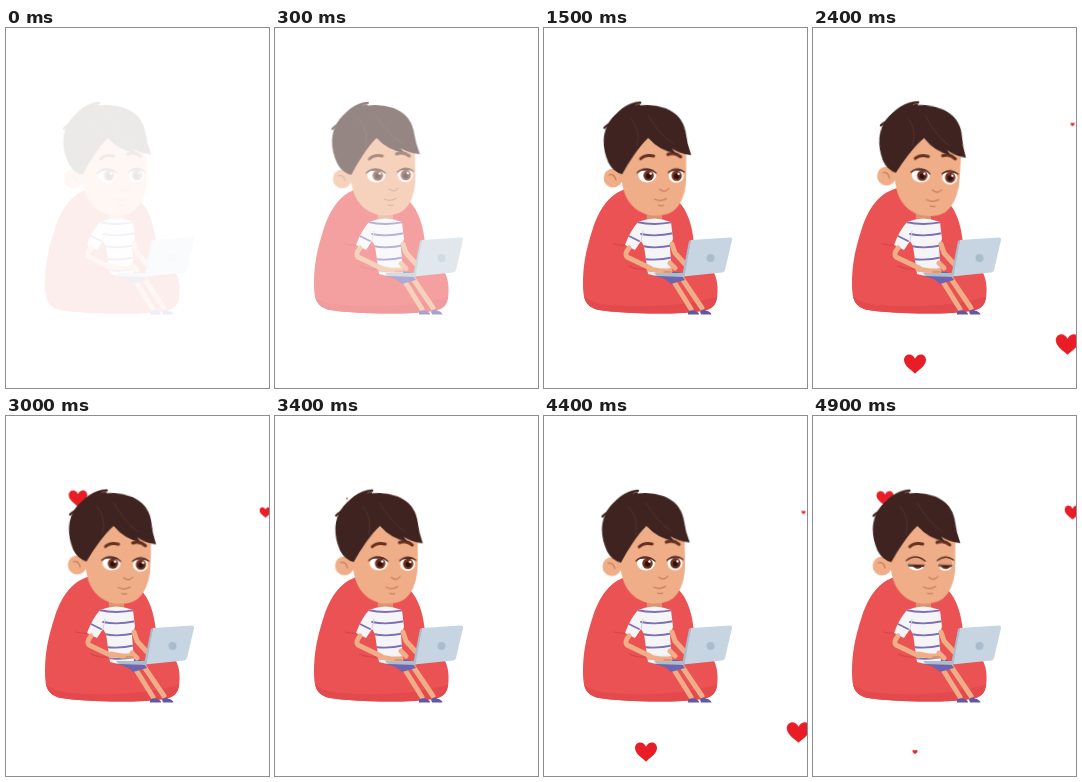
Write an HTML page without scripts that moves like this. It is 263x360 px and loops after 5 s.

```html
<!DOCTYPE html>
<html lang="en">
<head>
<meta charset="utf-8">
<title>Boy with laptop</title>
<style>
html, body { margin: 0; width: 100%; height: 100%; overflow: hidden; background: #fff; }
svg { display: block; width: 263px; height: 360px; }
.line { fill: none; stroke-linecap: round; stroke-linejoin: round; }
.skin { fill: #efae88; }
.limb { stroke: #efae88; stroke-width: 5; }
.hair { fill: #3e2320; }
.strand { stroke: #3e2320; stroke-width: 2.4; }
.brow { stroke: #65301f; stroke-width: 3; }
.crease { stroke: #c77b58; stroke-width: 1.2; }
.stripe { stroke: #7c70b2; stroke-width: 1.8; }
.lid { fill: #e9a27c; stroke: #3e2320; stroke-width: 1.6; }

.scene { animation: fade 5s linear infinite; }
.hearts { animation: show 5s step-end infinite; }
.heart { fill: #e91d25; transform: scale(0); animation: pop 5s linear var(--at) infinite; }
.head { transform-origin: 105px 225px; animation: sway 5s ease-in-out infinite; }
.lid { animation: blink 5s linear infinite; }
.hand { animation: type 1s ease-in-out infinite; }
.hand.alt { animation-name: type-alt; }

@keyframes fade { 0% { opacity: .1 } 12%, 100% { opacity: 1 } }
@keyframes show { 0% { opacity: 0 } 36% { opacity: 1 } }
@keyframes pop {
  0%, 16.6%, 40%, 56.6%, 100% { transform: scale(0) }
  1%, 41% { transform: scale(.21) }
  5.4%, 45.4% { transform: scale(.88) }
  8.5%, 48.5% { transform: scale(1) }
  11%, 51% { transform: scale(.83) }
  13.4%, 53.4% { transform: scale(.58) }
  15.4%, 55.4% { transform: scale(.2) }
}
@keyframes sway {
  0% { transform: rotate(.4deg) }
  14%, 78% { transform: rotate(0deg) }
  30% { transform: rotate(1.6deg); animation-timing-function: ease-out }
  48% { transform: rotate(5deg) }
  60% { transform: rotate(3.3deg) }
  100% { transform: rotate(1.7deg) }
}
@keyframes blink {
  0%, 95% { transform: none }
  98%, 100% { transform: translateY(7.5px) }
}
@keyframes type { 0%, 90%, 100% { transform: translateY(-2px) } 45% { transform: translateY(1px) } }
@keyframes type-alt { 0%, 90%, 100% { transform: translateY(1px) } 45% { transform: translateY(-1px) } }
</style>
</head>
<body>
<svg viewBox="0 0 263 360">
  <defs>
    <path id="heart" d="M0 .44C-.16 .28-.5 .08-.5-.18C-.5-.48-.12-.54 0-.24C.12-.54 .5-.48 .5-.18C.5 .08 .16 .28 0 .44Z"/>
    <path id="bag" d="M91 159C70 161 57 176 49 200C41 224 39 240 39 256C39 272 42 279 55 282C78 286 135 287 158 283C171 281 174 275 173.500 259C173 239 157 231 150 215C148 196 143 178 128 168C118 161 104 158 91 159Z"/>
    <path id="shirt" d="M94 194Q110 187 127 194L129 211L126 219L128 246Q116 250 104 246L100 218L97 213L91 222L81 217Q86 203 94 194Z"/>
    <clipPath id="in-bag"><use href="#bag"/></clipPath>
    <clipPath id="in-shirt"><use href="#shirt"/></clipPath>
    <clipPath id="in-left"><ellipse cx="101" cy="147.500" rx="9" ry="7"/></clipPath>
    <clipPath id="in-right"><ellipse cx="130" cy="147" rx="7.500" ry="7"/></clipPath>
  </defs>

  <g class="scene">
    <g class="hearts">
      <g transform="translate(254.500 316.500) scale(27)"><use href="#heart" class="heart" style="--at:1.88s"/></g>
      <g transform="translate(102 336) scale(25)"><use href="#heart" class="heart" style="--at:2.13s"/></g>
      <g transform="translate(259.500 96.500) scale(19)"><use href="#heart" class="heart" style="--at:2.35s"/></g>
      <g transform="translate(72 82.500) scale(19)"><use href="#heart" class="heart" style="--at:2.6s"/></g>
    </g>

    <!-- bean bag -->
    <use href="#bag" fill="#eb5254"/>
    <g clip-path="url(#in-bag)">
      <path d="M36 264Q43 275 66 277Q130 282 176 268V290H36Z" fill="#e4494d"/>
      <path class="line" d="M70 216Q78 218 86 217M85 238Q93 242 104 241" stroke="#d8434a" stroke-width="1.200"/>
    </g>

    <!-- legs -->
    <path class="line limb" d="M127 249L147 281M137 249L158 280"/>
    <path d="M110 244L135 244L141 252L127 256Q120 249 110 248Z" fill="#6e65ae"/>
    <path d="M144 284Q147 281 151 283Q155 284 155 286.500H144ZM156 283.500Q159 280 162 282.500Q167 284 167.500 286.500H157Z" fill="#6257a3"/>

    <!-- torso -->
    <path d="M102 176H118V192Q110 199 103 191Z" fill="#dd936d"/>
    <use href="#shirt" fill="#f5f4f7"/>
    <g clip-path="url(#in-shirt)">
      <path class="line stripe" d="M93 194Q110 198 130 194M97 206Q112 209 130 205M98 218Q112 221 130 217M100 231Q114 233 130 229M102 242Q114 244 130 241M83 207L95 213"/>
      <path class="line" d="M97 213L99 203" stroke="#d3d0dc"/>
    </g>

    <!-- arms and laptop -->
    <path class="line limb" d="M128 216L131 225L141 236"/>
    <path class="line limb" d="M85 220Q80 226 83 229L106 240"/>
    <path d="M110 245L140 245L140 249L113 248Z" fill="#a9bdcd"/>
    <g class="hand alt"><path class="line limb" stroke-width="4" d="M126 236L131 241"/></g>
    <g class="hand"><path class="line limb" d="M105 240L116 242L126 242"/><path class="line crease" d="M120 243L127 243"/></g>
    <path d="M147 212L186 209.500Q188.500 209.500 188 212L181 242Q180.500 244 178 244.500L139 248.500Z" fill="#c6d5e1"/>
    <path d="M145 213L147 212L140.500 248.300L138 248.500Z" fill="#a9bdcd"/>
    <circle cx="166.500" cy="230" r="4" fill="#a9bdcd"/>

    <g class="head">
      <path class="line strand" d="M57 101Q62 95 70 96M62 98Q74 77 92 75M69 91Q77 79 91 78"/>
      <circle class="skin" cx="67" cy="151" r="9.500"/>
      <path class="line crease" d="M63 148Q68 146 70 153"/>
      <path class="skin" d="M73 118Q73 158 82 172Q91 186 108 187.500Q126 188 133 177Q141 165 140 145L139 112Q105 88 73 118Z"/>

      <ellipse cx="101" cy="147.500" rx="9" ry="7" fill="#fff"/>
      <ellipse cx="130" cy="147" rx="7.500" ry="7" fill="#fff"/>
      <g clip-path="url(#in-left)">
        <circle cx="102.500" cy="147.500" r="5.200" fill="#74301d"/>
        <circle cx="102.500" cy="148" r="2.700" fill="#2b1310"/>
        <circle cx="104.500" cy="145.500" r="1.200" fill="#fff"/>
        <rect class="lid" x="88" y="126" width="26" height="16"/>
      </g>
      <g clip-path="url(#in-right)">
        <circle cx="130.500" cy="147" r="5.200" fill="#74301d"/>
        <circle cx="130.500" cy="147.500" r="2.700" fill="#2b1310"/>
        <circle cx="132.500" cy="145" r="1.200" fill="#fff"/>
        <rect class="lid" x="118" y="126" width="24" height="15.500"/>
      </g>
      <path class="line" d="M91 145Q100 137 110 145M122 144Q130 137 138 143" stroke="#5c2c20" stroke-width="1.300"/>
      <path class="line brow" d="M94 131Q99 126 107 128M121 126Q128 123 134 128"/>
      <path class="line crease" d="M114 161Q119 165 123 160M109 171Q116 174 121 170M113 177Q116 178 118 177"/>

      <path class="hair" d="M76 147Q67 145 62 136Q55 121 57 108Q60 88 81 80Q99 74 118 80Q134 86 138 102Q140 115 144.500 126Q133 125 125 120Q128 124 130 125Q113 123 101 110Q94 117 87 128Q81 137 76 147Z"/>
      <path class="line" d="M83 91Q94 103 90 119M100 87Q111 105 126 115" stroke="#54322b"/>
    </g>
  </g>
</svg>
</body>
</html>
```
